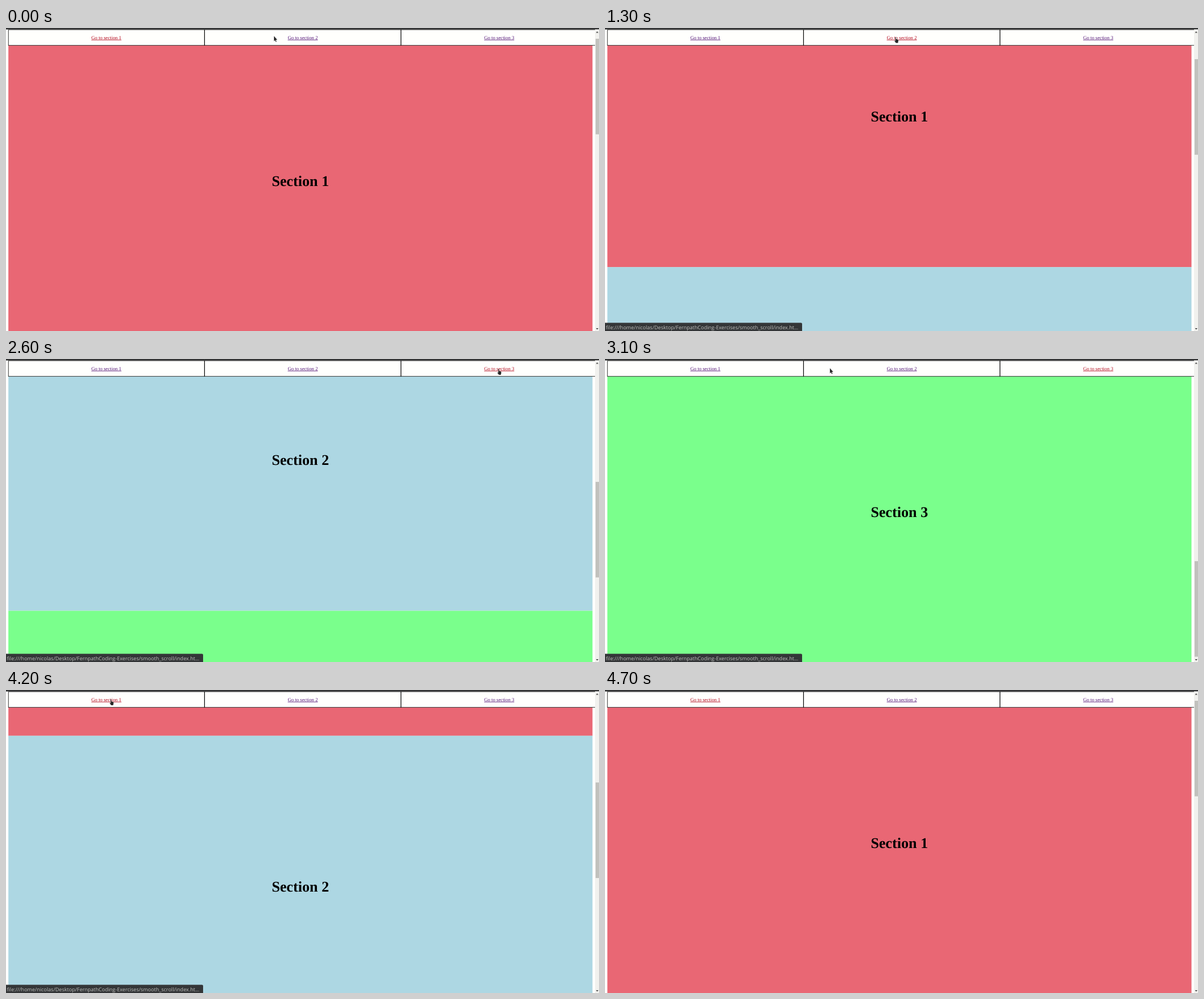
An HTML page for the animation above (5300 ms loop, 1047 px wide and 535 px high).

```html
<!DOCTYPE html>
<html lang="en">
<head>
<meta charset="utf-8">
<title>Smooth scroll</title>
<style>
  html, body { margin: 0; width: 100%; height: 100%; overflow: hidden; background: #fffffd; }
  svg { display: block; width: 1047px; height: 535px; }
  text { font-family: "Liberation Serif", "Times New Roman", serif; text-anchor: middle; text-rendering: geometricPrecision; }
  .title { font-size: 26.18px; font-weight: bold; }
  .link { font-size: 8.73px; text-decoration: underline; }
  .status { font: 9.05px "Open Sans", sans-serif; text-anchor: start; fill: #bfc0bd; }
</style>
</head>
<body>
<svg viewBox="0 0 1047 535">
  <g id="page"></g>
  <rect width="1047" height="31" fill="#fffffd"/>
  <rect width="1047" height="2.6" fill="#333435"/>
  <path d="M4.3 31V3H1040M4 30.6H1040" fill="none" stroke="#000" stroke-width=".8"/>
  <path d="M350.5 3V31M697.4 3V31" stroke="#000" stroke-width="1.2"/>
  <g id="nav"></g>
  <rect x="1040" y="2.6" width="7" height="533" fill="#f1f1ee"/>
  <rect id="thumb" x="1041" width="6" height="168.7" fill="#c1c1bd"/>
  <path d="M1041.6 8.5h4.4l-2.2-2.4zM1041.6 530h4.4l-2.2 2.4z" fill="#444"/>
  <g id="status">
    <path d="M0 535V520.6H346a2 2 0 0 1 2 2V535z" fill="#343638"/>
    <text class="status" x="1.5" y="531.7">file:///home/nicolas/Desktop/FernpathCoding-Exercises/smooth_scroll/index.ht...</text>
  </g>
  <g id="cursor" fill="#262626" stroke="#fff" stroke-opacity=".5" stroke-width=".5">
    <path id="arrow" d="M0 0V9.4L2 7.7L3.4 10.8L4.9 10.1L3.5 7.2L6 6.8z"/>
    <path id="hand" d="M1.6 .6Q2.6 -.2 3.1 1V4L6.3 4.9Q7.4 5.4 7 7.2L6.4 11H2.7L.2 7.8Q-.3 6.7 .7 6.6L1.6 7.2z"/>
  </g>
</svg>
<script>
const LOOP = 5300, TICK = 100, HEIGHT = 533;
const $ = id => document.getElementById(id);
const linkX = i => 177.2 + i * 346.8;

const colors = ["#e96774", "#add7e3", "#7aff8c"];
$("page").innerHTML = colors.map((c, i) =>
  `<rect x="4.2" y="${3 + i * HEIGHT}" width="1031.3" height="${HEIGHT}" fill="${c}"/>
   <text class="title" x="519.7" y="${278.7 + i * HEIGHT}">Section ${i + 1}</text>`).join("");
$("nav").innerHTML = colors.map((c, i) =>
  `<text class="link" x="${linkX(i)}" y="19.7">Go to section ${i + 1}</text>`).join("");
const links = [...$("nav").children];

// The page first redraws at "paint", part of the way into each scroll.
const clicks = [
  { press: 1100, paint: 1300, start: 1124, time: 550, to: 1 },
  { press: 2400, paint: 2500, start: 2442, time: 550, to: 2 },
  { press: 3700, paint: 3800, start: 3771.4, time: 790, to: 0 }
];

// Cursor glides: start, end, x, y
const glides = [
  [100, 600, 511, 15.5], [1800, 1900, 829, 15], [1900, 2100, 867.5, 17],
  [2900, 3100, 397, 16], [3200, 3600, 183, 16], [4300, 4500, 220, -20]
];

// cubic-bezier(.42, 0, .58, 1)
function easeInOut(x) {
  let lo = 0, hi = 1;
  for (let i = 0; i < 24; i++) {
    const p = (lo + hi) / 2, q = 1 - p;
    if (3 * q * q * p * .42 + 3 * q * p * p * .58 + p ** 3 < x) lo = p; else hi = p;
  }
  return lo * lo * (3 - 2 * lo);
}

const progress = (t, start, time) => Math.min(1, Math.max(0, (t - start) / time));

function scrollAt(t) {
  let pos = 0;
  for (const c of clicks)
    if (t >= c.paint) pos += (c.to - pos) * easeInOut(progress(t, c.start, c.time));
    else break;
  return pos * HEIGHT;
}

function cursorAt(t) {
  let x = 473, y = 14;
  for (const [start, end, toX, toY] of glides) {
    const k = progress(t, start, end - start);
    x += (toX - x) * k;
    y += (toY - y) * k;
  }
  const hover = y > 8 && links.some((el, i) => Math.abs(x + 2 - linkX(i)) < 27);
  return { x, y, hover };
}

function isRed(i, t) {
  const focused = clicks.filter(c => t >= c.paint).pop();
  const pressed = clicks.filter(c => t >= c.press).pop();
  return i === (focused ? focused.to : 0) || i === (pressed ? pressed.to : 0);
}

function draw(now) {
  const t = Math.floor(now % LOOP / TICK) * TICK;
  const top = scrollAt(t), { x, y, hover } = cursorAt(t);
  $("page").setAttribute("transform", `translate(0 ${-top})`);
  $("thumb").setAttribute("y", 19 + top * .317);
  links.forEach((el, i) => el.setAttribute("fill", isRed(i, t) ? "#b3081c" : "#541678"));
  $("cursor").setAttribute("transform", `translate(${x} ${y})`);
  $("hand").style.display = hover ? "" : "none";
  $("arrow").style.display = hover ? "none" : "";
  // The status bar lingers after the cursor leaves a link.
  const lit = [0, 100, 200, 300].some(ago => cursorAt(t - ago).hover);
  $("status").style.display = lit ? "" : "none";
  requestAnimationFrame(draw);
}
requestAnimationFrame(draw);
</script>
</body>
</html>
```
